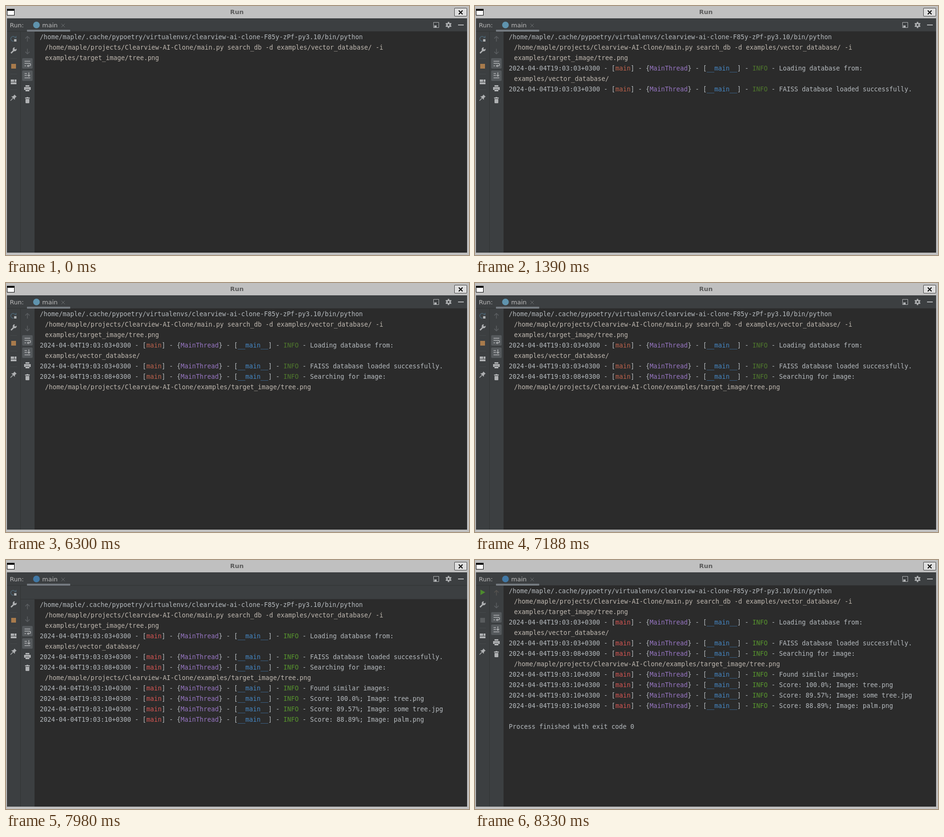
Recreate the animation shown at these times as an HTML page with a canvas. Size 973 by 525 pixels, loop 9.32 s.

```html
<!DOCTYPE html>
<html lang="en">
<head>
<meta charset="utf-8">
<title>Run</title>
<style>
  html, body { margin: 0; width: 100%; height: 100%; overflow: hidden; background: #c0c0c0; }
  canvas { display: block; }
</style>
</head>
<body>
<canvas id="stage" width="973" height="525"></canvas>
<script>
const ctx = document.getElementById('stage').getContext('2d', { alpha: false });

const LOOP = 9320;
const LOADED = 1390, SEARCHING = 6300, FOUND = 7780, PANEL_OPEN = 7980, STOPPED = 8190, EXITED = 8330;

const CELL = 8, LINE = 22, LEFT = 71, WRAP_LEFT = 82, FIRST_BASELINE = 70;
const PANEL_HEIGHT = 29;
const MONO = '13.288px "DejaVu Sans Mono", monospace';
const SANS = '13px "DejaVu Sans", sans-serif';

const C = {
  frame: '#c0c0c0', bar: '#3c3f41', edge: '#323435', console: '#2b2b2b',
  icon: '#afb1b3', label: '#bbbbbb', pressed: '#55595c', dim: '#5b5f62', rerun: '#4c6270',
  text: '#b6bbbf', wrapped: '#bfb8b0', purple: '#9876c4', blue: '#4587c4',
  red: '#d65552', green: '#58962e', mutedRed: '#bd624c', mutedGreen: '#507a2d'
};

const plain = (from, row, text) => ({ from, row, text });
const wrapped = (from, row, text) => ({ from, row, text, wrap: true });
const log = (from, row, second, text) => ({ from, row, second, text });

const lines = [
  plain(0, 0, '/home/maple/.cache/pypoetry/virtualenvs/clearview-ai-clone-F85y-zPf-py3.10/bin/python'),
  wrapped(0, 1, '/home/maple/projects/Clearview-AI-Clone/main.py search_db -d examples/vector_database/ -i'),
  wrapped(0, 2, 'examples/target_image/tree.png'),
  log(LOADED, 3, '03', 'Loading database from:'),
  wrapped(LOADED, 4, 'examples/vector_database/'),
  log(LOADED, 5, '03', 'FAISS database loaded successfully.'),
  log(SEARCHING, 6, '08', 'Searching for image:'),
  wrapped(SEARCHING, 7, '/home/maple/projects/Clearview-AI-Clone/examples/target_image/tree.png'),
  log(FOUND, 8, '10', 'Found similar images:'),
  log(FOUND, 9, '10', 'Score: 100.0%; Image: tree.png'),
  log(FOUND, 10, '10', 'Score: 89.57%; Image: some tree.jpg'),
  log(FOUND, 11, '10', 'Score: 88.89%; Image: palm.png'),
  plain(EXITED, 13, 'Process finished with exit code 0')
];

function rect(x, y, w, h, color) {
  ctx.fillStyle = color;
  ctx.fillRect(x, y, w, h);
}

function box(x, y, w, h, r, color) {
  ctx.fillStyle = color;
  ctx.beginPath();
  ctx.roundRect(x, y, w, h, r);
  ctx.fill();
}

function disc(x, y, r, color) {
  ctx.fillStyle = color;
  ctx.beginPath();
  ctx.arc(x, y, r, 0, Math.PI * 2);
  ctx.fill();
}

function stroke(path, color, width = 1.5) {
  ctx.strokeStyle = color;
  ctx.lineWidth = width;
  ctx.stroke(new Path2D(path));
}

function fill(path, color) {
  ctx.fillStyle = color;
  ctx.fill(new Path2D(path));
}

function write(text, x, y, color, font) {
  ctx.font = font;
  ctx.fillStyle = color;
  ctx.fillText(text, x, y);
}

function drawWindow() {
  rect(0, 0, 973, 525, C.frame);
  rect(2, 6, 16, 14, '#000');
  rect(3, 10, 14, 9, '#fff');
  write('Run', 471, 17, '#5a5a5a', 'bold ' + SANS);
  box(942, 4, 27, 18, 2, '#444');
  box(943, 5, 25, 16, 1, '#dedede');
  stroke('M951.5 9.5L959.5 17.5M959.5 9.5L951.5 17.5', '#000', 2);

  rect(2, 26, 967, 494, C.bar);
  rect(2, 53, 967, 1, C.edge);
  rect(30, 54, 1, 466, C.edge);
}

function drawGear(x, y) {
  ctx.save();
  ctx.translate(x, y);
  for (let i = 0; i < 6; i++) {
    rect(-1.5, -6.5, 3, 4, C.icon);
    ctx.rotate(Math.PI / 3);
  }
  disc(0, 0, 4.7, C.icon);
  disc(0, 0, 2, C.bar);
  ctx.restore();
}

function drawHeader(t) {
  write('Run:', 8, 45, C.label, SANS);
  disc(64, 40, 7, t < PANEL_OPEN ? '#5f93ad' : '#4178a5');
  write('main', 76, 45, C.label, SANS);
  stroke('M116.5 37.5L123.5 44.5M123.5 37.5L116.5 44.5', '#6c6f71', 1);
  box(44, 50, 91, 4, 1, '#747a80');

  stroke('M898.5 34.5H909.5V45.5H898.5Z', C.icon, 1);
  rect(900, 41, 5, 4, C.icon);
  drawGear(930, 40);
  rect(950, 39, 12, 2, C.icon);
}

function drawRunColumn(t) {
  const running = t < STOPPED;
  if (running) {
    stroke('M16 74A5 5 0 1 1 18.5 65.5', C.rerun, 1.7);
    fill('M17 67.5H22V62.5Z', C.rerun);
    rect(17, 70, 5, 5, C.icon);
  } else {
    fill('M11.5 62.5L21.5 68L11.5 74Z', '#4d8c2d');
  }

  stroke('M10.5 99.5L17 93', C.icon, 2.8);
  fill('M22.3 90A4.2 4.2 0 1 1 18.5 87L17.5 90L19.3 91.7Z', C.icon);
  rect(11, 122, 10, 10, running ? '#a87b4c' : '#595c5e');
  for (const y of [110, 143, 176]) rect(9, y, 14, 1, '#45494b');

  rect(10, 155, 7, 5, C.icon);
  rect(18, 155, 4, 5, C.icon);
  rect(10, 161, 12, 4, C.icon);

  fill('M17.5 186.5L22.5 191.5L20.5 192L18.5 195V198L11 190.5H14L17 188.5Z', C.icon);
  stroke('M14.5 194.5L9.5 199.5', C.icon, 1.4);
}

function drawConsoleColumn(t) {
  stroke('M45 75V64.5M40.5 68.5L45 64L49.5 68.5', t < STOPPED ? C.dim : '#565451');
  stroke('M45 90V100.5M40.5 96.5L45 101L49.5 96.5', C.dim);

  box(34, 110, 22, 22, 2, C.pressed);
  stroke('M39 116.5H51M39 121H49A2.6 2.6 0 0 1 49 126.2H46.5M39 126.2H42', C.icon);
  fill('M47.5 123.2V129.2L43.8 126.2Z', C.icon);

  box(34, 136, 22, 22, 2, C.pressed);
  stroke('M39 142.5H44M39 146.5H44M39 151.5H51', C.icon);
  stroke('M48 140V148M45.2 145.5L48 148.3L50.8 145.5', C.icon);

  rect(41, 167, 8, 3, C.icon);
  rect(38, 171, 14, 6, C.icon);
  rect(41, 175, 8, 1, C.bar);
  rect(41, 176, 8, 4, C.icon);

  rect(40, 193, 10, 2, C.icon);
  rect(43, 192, 4, 1, C.icon);
  box(41, 196, 8, 9, [0, 0, 1.5, 1.5], C.icon);
}

function drawLine(line, t) {
  const y = FIRST_BASELINE + line.row * LINE;
  if (!line.second) {
    const x = line.wrap ? WRAP_LEFT : LEFT;
    write(line.text, x, y, line.wrap ? C.wrapped : C.text, MONO);
    return;
  }
  const muted = t < PANEL_OPEN && line.from < FOUND;
  const parts = [
    [`2024-04-04T19:03:${line.second}+0300 - [`, C.text],
    ['main', muted ? C.mutedRed : C.red],
    ['] - {', C.text],
    ['MainThread', C.purple],
    ['} - [', C.text],
    ['__main__', C.blue],
    ['] - ', C.text],
    ['INFO', muted ? C.mutedGreen : C.green],
    [' - ' + line.text, C.text]
  ];
  let x = LEFT;
  for (const [text, color] of parts) {
    write(text, x, y, color, MONO);
    x += text.length * CELL;
  }
}

function drawConsole(t) {
  const shift = t >= PANEL_OPEN && t < STOPPED ? PANEL_HEIGHT : 0;
  rect(60, 54 + shift, 909, 466 - shift, C.console);
  if (shift) rect(31, 53 + shift, 938, 1, C.edge);
  ctx.save();
  ctx.translate(0, shift);
  drawConsoleColumn(t);
  for (const line of lines) if (t >= line.from) drawLine(line, t);
  ctx.restore();
}

function draw(t) {
  drawWindow();
  drawHeader(t);
  drawRunColumn(t);
  drawConsole(t);
}

const start = performance.now();
function tick() {
  draw((performance.now() - start) % LOOP);
  requestAnimationFrame(tick);
}
tick();
</script>
</body>
</html>
```
